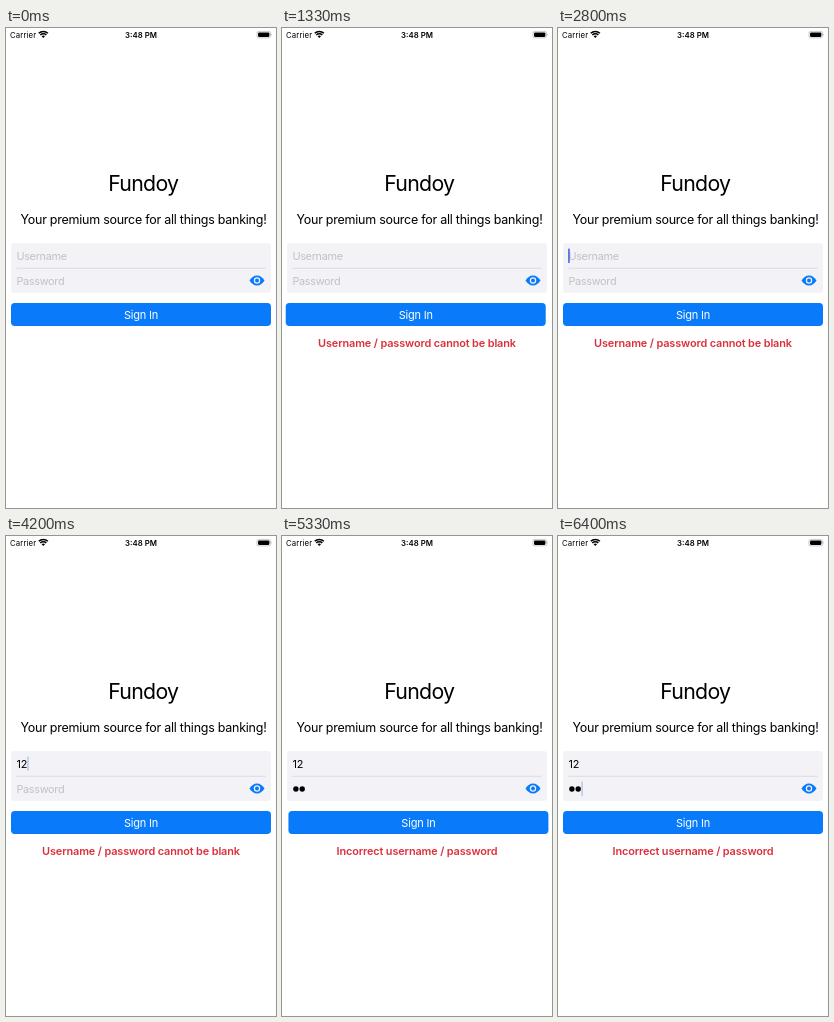
Animation, 270 px wide and 480 px high, one loop 6.47 s. Source, as an HTML page:

```html
<!DOCTYPE html>
<html lang="en">
<head>
<meta charset="utf-8">
<title>Sign in</title>
<style>
  html, body { margin: 0; width: 100%; height: 100%; overflow: hidden; background: #fff; }
  svg { display: block; width: 100%; height: 100%; }
  text { font-family: Inter, Roboto, sans-serif; fill: #000; }
  .mid { text-anchor: middle; }
  .status { font-size: 7.8px; }
  .field { font-size: 10.9px; }
  .hint { fill: #c2c2c6; letter-spacing: -.32px; }
  .error { font-size: 10.9px; font-weight: 600; letter-spacing: -.12px; fill: #db303c; }
</style>
</head>
<body>
<svg viewBox="0 0 270 480">
  <rect width="270" height="480" fill="#fff"/>

  <text class="status" x="4" y="9.5" letter-spacing=".1">Carrier</text>
  <g fill="none" stroke="#000" stroke-width="1.5">
    <path d="M32.7 5.3a6.5 6.5 0 0 1 9.2 0"/>
    <path d="M34.3 6.9a4.2 4.2 0 0 1 6 0"/>
  </g>
  <path d="M37.3 10.1l-1.7-1.8a2.4 2.4 0 0 1 3.4 0z"/>
  <text class="status mid" x="135" y="9.5" font-weight="600">3:48 PM</text>
  <rect x="250.9" y="3.4" width="13.6" height="6.5" rx="1.9" fill="none" stroke="#000" stroke-opacity=".35" stroke-width=".6"/>
  <rect x="252" y="4.4" width="11.4" height="4.5" rx="1.1"/>
  <path d="M265.3 5.5q1.2 1.1 0 2.3z" fill-opacity=".45"/>

  <text class="mid" x="137.3" y="162.8" font-size="21.3" letter-spacing="-.7">Fundoy</text>
  <text class="mid" x="137.5" y="196.2" font-size="12.5" letter-spacing="-.25">Your premium source for all things banking!</text>

  <rect x="5" y="215" width="260" height="50" rx="3.3" fill="#f2f2f7"/>
  <path d="M10.4 240.3H259.5" stroke="#d3d3d8" stroke-width=".7"/>
  <text id="user" class="field" x="10.4" y="232"></text>
  <text id="hint" class="field hint" x="10.4" y="257">Password</text>
  <circle id="dot1" cx="13.9" cy="253" r="2.7"/>
  <circle id="dot2" cx="20.2" cy="253" r="2.7"/>
  <rect id="caret" width="1.5" height="14.5" rx=".6" fill="#3460d6"/>

  <path d="M243.5 252.5C245.2 249.6 248 247.5 251 247.5S256.8 249.6 258.5 252.5C256.8 255.4 254 257.5 251 257.5S245.2 255.4 243.5 252.5Z" fill="#097bfa"/>
  <circle cx="251" cy="252.5" r="3.2" fill="#f2f2f7"/>
  <circle cx="251" cy="252.5" r="2" fill="#097bfa"/>

  <g id="button">
    <rect x="5" y="275" width="260" height="23" rx="3.7" fill="#097bfa"/>
    <text class="mid" x="135" y="290.5" font-size="11" letter-spacing="-.2" style="fill:#fff">Sign In</text>
  </g>
  <text id="error" class="error mid" x="135" y="318.6"></text>
</svg>
<script>
  const LOOP = 6470;
  const POINT = 270 / 414;
  const SHAKE_MS = 400;
  const SHAKE = [[0, 0], [.16, 10], [.5, -10], [.83, 10], [1, 0]];
  const TAPS = [
    { down: 925, up: 1065, shake: 1078 },
    { down: 1795, up: 1860, shake: 1960 },
    { down: 5125, up: 5195, shake: 5317 },
    { down: 5795, up: 5860, shake: 5960 }
  ];
  const BLINKS = [3930, 5130, 6130];
  const FOCUS_USER = 2795, TYPE_1 = 3265, TYPE_2 = 3465;
  const FOCUS_PASS = 4265, DOT_1 = 4395, DOT_2 = 4525;
  const BLANK_ERROR = 1065, WRONG_ERROR = 5305;

  const $ = id => document.getElementById(id);
  const clamp = v => Math.max(0, Math.min(1, v));
  const setText = (el, s) => { if (el.textContent !== s) el.textContent = s; };
  const show = (el, on) => el.setAttribute('visibility', on ? 'visible' : 'hidden');

  function shakeAt(ms) {
    const p = ms / SHAKE_MS;
    if (p <= 0 || p >= 1) return 0;
    const i = SHAKE.findIndex(k => p < k[0]);
    const [t0, a] = SHAKE[i - 1], [t1, b] = SHAKE[i];
    return (a + (b - a) * (p - t0) / (t1 - t0)) * POINT;
  }

  // Fade out, stay dark briefly, fade back in
  function caretAlpha(t) {
    const start = BLINKS.filter(b => b <= t).pop();
    if (start === undefined) return 1;
    const u = t - start;
    return u < 200 ? 1 - clamp(u / 140) : clamp((u - 220) / 170);
  }

  function caretPos(t) {
    if (t >= FOCUS_PASS) return [t >= DOT_2 ? 23.4 : t >= DOT_1 ? 17.1 : 10.2, 245.5];
    return [t >= TYPE_2 ? 21.2 : t >= TYPE_1 ? 15.4 : 10.2, 220.5];
  }

  function render(t) {
    const shift = TAPS.reduce((sum, tap) => sum + shakeAt(t - tap.shake), 0);
    const pressed = TAPS.some(tap => t >= tap.down && t < tap.up);
    $('button').setAttribute('transform', `translate(${shift} 0)`);
    $('button').setAttribute('opacity', pressed ? .85 : 1);

    const typed = t >= TYPE_1;
    setText($('user'), t >= TYPE_2 ? '12' : typed ? '1' : 'Username');
    $('user').classList.toggle('hint', !typed);
    show($('hint'), t < DOT_1);
    show($('dot1'), t >= DOT_1);
    show($('dot2'), t >= DOT_2);

    const [x, y] = caretPos(t);
    const caret = $('caret');
    caret.setAttribute('x', x);
    caret.setAttribute('y', y);
    caret.setAttribute('opacity', t < FOCUS_USER ? 0 : caretAlpha(t));

    setText($('error'), t < BLANK_ERROR ? '' : t < WRONG_ERROR
      ? 'Username / password cannot be blank'
      : 'Incorrect username / password');
  }

  const start = performance.now();
  function tick() {
    render((performance.now() - start) % LOOP);
    requestAnimationFrame(tick);
  }
  tick();
</script>
</body>
</html>
```
